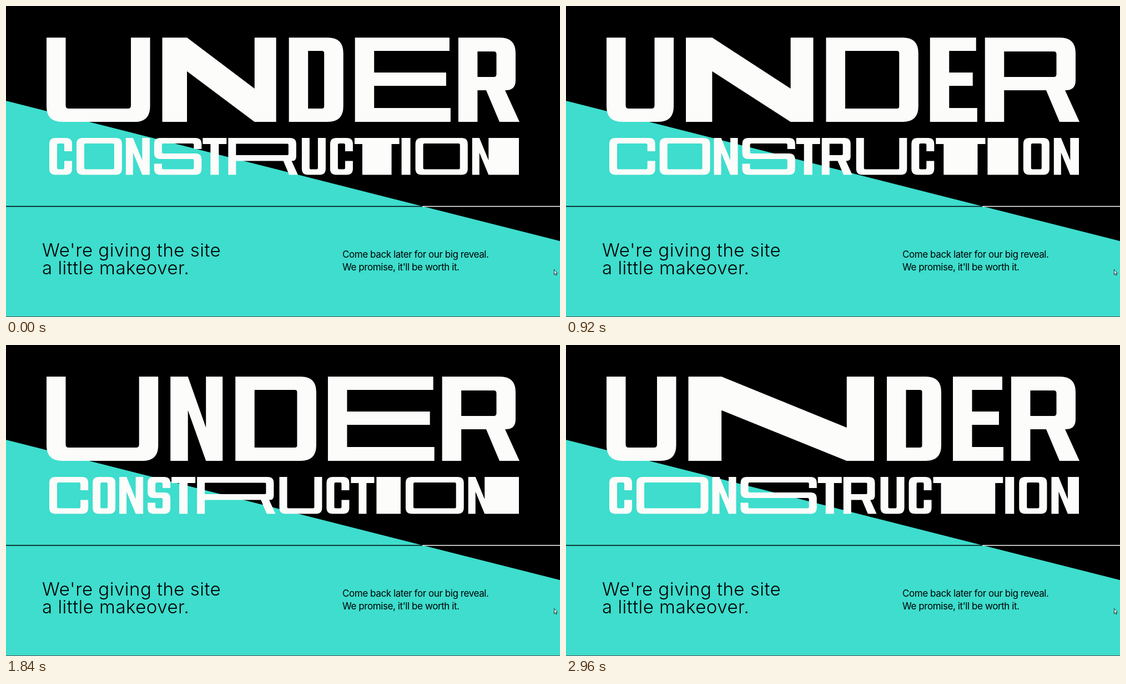
An HTML page that plays this animation: 998 px wide and 561 px high, repeating every 3000 ms.

```html
<!DOCTYPE html>
<html lang="en">
<head>
<meta charset="utf-8">
<title>Under construction</title>
<style>
  html, body { margin: 0; width: 100%; height: 100%; overflow: hidden; background: #000; }
  svg { display: block; width: 998px; height: 561px; }
  text { font-family: Inter, sans-serif; fill: #000; }
  .lead { font-size: 33px; font-weight: 300; letter-spacing: .5px; }
  .note { font-size: 17px; letter-spacing: -.42px; }
</style>
</head>
<body>
<svg viewBox="0 0 998 561">
  <rect width="998" height="561"/>
  <path d="M0 171 998 424V560H0Z" fill="#3eddcd"/>
  <path d="M0 560.5H998" stroke="#555"/>
  <path d="M0 361.5H750" stroke="#000" stroke-width="1.4"/>
  <path d="M750 361.5H998" stroke="#fff" stroke-width="1.4"/>
  <path id="title" fill="#fcfcfa" fill-rule="evenodd"/>
  <text class="lead" x="65" y="452">We're giving the site</text>
  <text class="lead" x="65" y="483.5">a little makeover.</text>
  <text class="note" x="606" y="453.5">Come back later for our big reveal.</text>
  <text class="note" x="606" y="477">We promise, it'll be worth it.</text>
  <path d="M987.5 475.5v9l2-1.8 1.3 3 1.4-.6-1.3-2.9h2.4Z" fill="#fff" stroke="#000" stroke-width=".8"/>
</svg>
<script>
const LOOP = 3000, CYCLE = 1520, STEP = 40;

// Letters: [glyph, narrow width, gap after, pose that widens it, extra width]
const rows = [
  { top: 57, bottom: 209, stem: 34.5, bar: 24, radius: 28, left: 73, right: 925, letters: [
    ['U', 121, 22, 'a', 118], ['N', 94, 23, 'c', 250], ['D', 98, 21, 'b', 149],
    ['E', 85, 14, 'a', 157], ['R', 111, 0]] },
  { top: 238, bottom: 304.5, stem: 14, bar: 10, radius: 11, left: 78, right: 924, letters: [
    ['C', 41, 8, 'b', 91], ['O', 41, 7, 'c', 92], ['n', 43, 8], ['S', 41, 2, 'c', 100],
    ['T', 43, 3], ['R', 55, 7, 'a', 127], ['U', 43, 8, 'b', 106], ['C', 41, 3],
    ['T', 42, 4, 'c', 87], ['I', 16, 9, 'b', 86], ['O', 47, 8, 'a', 85], ['n', 43, 0]] }
];

// Closed polygon; a third value in a point rounds that corner.
function poly(points) {
  const toward = (p, q, r) => {
    const k = r / Math.hypot(q[0] - p[0], q[1] - p[1]);
    return `${(p[0] + (q[0] - p[0]) * k).toFixed(2)} ${(p[1] + (q[1] - p[1]) * k).toFixed(2)}`;
  };
  const n = points.length;
  return 'M' + points.map((p, i) => {
    const r = p[2] || 0;
    if (!r) return `${p[0].toFixed(2)} ${p[1].toFixed(2)}`;
    const before = points[(i + n - 1) % n], after = points[(i + 1) % n];
    return `${toward(p, before, r)}Q${p[0].toFixed(2)} ${p[1].toFixed(2)} ${toward(p, after, r)}`;
  }).join('L') + 'Z';
}

const box = (l, t, r, b, lr = 0, rr = lr) => poly([[l, t, lr], [r, t, rr], [r, b, rr], [l, b, lr]]);

function diagonal(l, r, { top: t, bottom: b }, leftStem, rightStem) {
  const h = b - t, p = l + leftStem, q = r - rightStem;
  return poly([[l, t], [p, t], [q, t + h * .605], [q, t], [r, t], [r, b],
    [q, b], [p, t + h * .4], [p, b], [l, b]]);
}

const glyphs = {
  U: (l, r, { top: t, bottom: b, stem: s, bar: h, radius: R }) => poly([
    [l, t], [l + s, t], [l + s, b - h, R / 5], [r - s, b - h, R / 5], [r - s, t], [r, t], [r, b, R], [l, b, R]]),
  N: (l, r, row) => diagonal(l, r, row, 20.5 + .117 * (r - l), 22.5 + .08 * (r - l)),
  n: (l, r, row) => diagonal(l, r, row, 13, r - l - 29.5),
  D: (l, r, { top: t, bottom: b, stem: s, bar: h, radius: R }) =>
    box(l, t, r, b, 0, R) + box(l + s, t + h, r - s, b - h, 0, R / 7),
  O: (l, r, { top: t, bottom: b, stem: s, bar: h, radius: R }) =>
    box(l, t, r, b, R) + box(l + s, t + h, r - s, b - h, 2.5),
  E: (l, r, { top: t, bottom: b, stem: s, bar: h }) => poly([
    [l, t], [r - 2, t], [r - 2, t + h], [l + s, t + h], [l + s, t + 63], [r - 8, t + 63],
    [r - 8, t + 87], [l + s, t + 87], [l + s, b - h - 1], [r, b - h - 1], [r, b], [l, b]]),
  R: (l, r, { top: t, bottom: b, stem: s, bar: h, radius: R }) => {
    const k = (b - t) / 152, bowl = r - 7 * k, mid = t + 95 * k;
    return poly([[l, t], [bowl, t, R], [bowl, mid, 18 * k], [r - 26 * k, mid], [r, b], [r - 36 * k, b],
      [r - 60 * k, mid], [l + s, mid], [l + s, b], [l, b]]) +
      box(l + s, t + h + k, bowl - s, t + 71 * k, 0, R / 6);
  },
  C: (l, r, { top: t, bottom: b, stem: s, bar: h, radius: R }) => poly([
    [l, t, R], [r, t, R], [r, t + 24], [r - s, t + 24], [r - s, t + h, 2.5], [l + s, t + h, 2.5],
    [l + s, b - h, 2.5], [r - s, b - h, 2.5], [r - s, b - 25], [r, b - 25], [r, b, R], [l, b, R]]),
  S: (l, r, { top: t, bottom: b, stem: s, bar: h, radius: R }) => poly([
    [l, t, R], [r, t, R], [r, t + 20], [r - s, t + 20], [r - s, t + h, 2.5], [l + s, t + h, 2.5],
    [l + s, t + 28, 2.5], [r, t + 28, R], [r, b, R], [l, b, R], [l, b - 20], [l + s, b - 20],
    [l + s, b - h, 2.5], [r - s, b - h, 2.5], [r - s, t + 38, 2.5], [l, t + 38, R]]),
  T: (l, r, { top: t, bottom: b, stem: s, bar: h }) => poly([
    [l, t], [r, t], [r, t + h + 1], [r - s, t + h + 1], [r - s, b], [l + s, b], [l + s, t + h + 1], [l, t + h + 1]]),
  I: (l, r, { top: t, bottom: b }) => box(l, t, r, b)
};

function ease(time, start, length) {
  const u = Math.min(1, Math.max(0, (time - start) / length));
  return u < .5 ? 4 * u ** 3 : 1 - 4 * (1 - u) ** 3;
}

// Shares of the three width poses; they always add up to 1.
function poses(time) {
  const start = 90;
  const t = (time % CYCLE + CYCLE - start) % CYCLE + start;
  const ab = ease(t, 86, 543), bc = ease(t, 634, 556), ca = ease(t, 1385, 260);
  return { a: 1 - ab + ca, b: ab - bc, c: bc - ca };
}

function drawRow(row, share) {
  let x = row.left;
  return row.letters.map(([glyph, width, gap, pose, extra], i) => {
    const last = i === row.letters.length - 1;
    const end = last ? row.right : x + width + (pose ? extra * share[pose] : 0);
    const path = glyphs[glyph](x, end, row);
    x = end + gap;
    return path;
  }).join('');
}

const title = document.getElementById('title');

function render(time) {
  const share = poses(Math.floor(time % LOOP / STEP) * STEP);
  title.setAttribute('d', rows.map(row => drawRow(row, share)).join(''));
}

const begin = performance.now();
function tick() {
  render(performance.now() - begin);
  requestAnimationFrame(tick);
}
tick();
</script>
</body>
</html>
```
